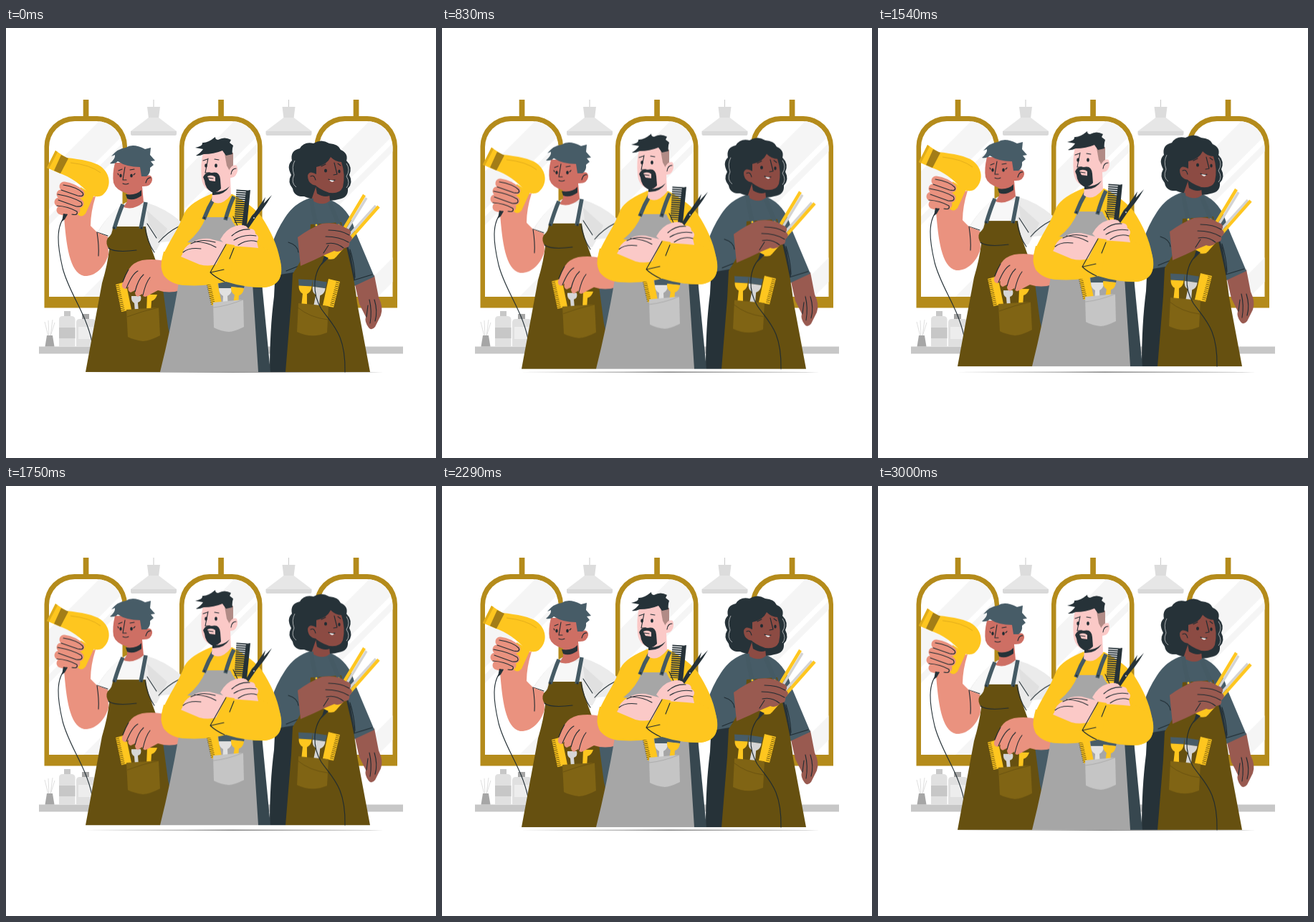
Recreate the animation shown at these times as an HTML page. Size 600x600 px, loop 3040 ms.

```html
<!DOCTYPE html>
<html lang="en">
<head>
<meta charset="utf-8">
<title>Hair salon team</title>
<style>
  html, body { margin: 0; width: 100%; height: 100%; overflow: hidden; background: #fff; }
  svg { display: block; width: 100vw; height: 100vh; }
  .ink { fill: none; stroke: #1f2b31; stroke-width: 1.1; stroke-linecap: round; stroke-linejoin: round; }
  .strap { fill: none; stroke: #455a64; stroke-width: 5.5; }
  .yellow { fill: #fec61f; }
  .ochre { fill: #b48b1b; }
  .brown { fill: #665010; }
  .pouch { fill: #806414; }
  .slate { fill: #475c67; }
  .dark { fill: #263238; }
  .tan { fill: #ea927f; }
  .blush { fill: #ce6f64; }
  .pink { fill: #fbc9c7; }
  .umber { fill: #995a50; }
  .cocoa { fill: #8c4b43; }
  .fingers { fill: none; stroke: #ea927f; stroke-width: 13; stroke-linecap: round; }
</style>
</head>
<body>
<svg viewBox="0 0 600 600">
  <defs>
    <path id="glass" d="M60 375V166A36 36 0 0 1 96 130H126.500A36 36 0 0 1 162.500 166V375Z"/>
    <clipPath id="pane"><use href="#glass"/></clipPath>
    <g id="mirror">
      <path class="ochre" d="M107.700 100h7.700v24h-7.700ZM53.500 390.500V165A42 42 0 0 1 95.500 123H127A42 42 0 0 1 169 165V390.500Z"/>
      <use href="#glass" fill="#fff"/>
      <g clip-path="url(#pane)" fill="#f5f5f5">
        <path d="M60 200L130 130H163V150L60 253ZM60 263L165 158V170L60 275ZM108 375L165 318V352L142 375Z"/>
      </g>
    </g>
    <g id="lamp">
      <path d="M206 100V111" stroke="#c9c9c9"/>
      <path fill="#dcdcdc" d="M197 110H215L213 126H199Z"/>
      <path fill="#e6e6e6" d="M199 125H213L238 144H174Z"/>
      <path fill="#d9d9d9" d="M174 144H238V148Q238 150 236 150H176Q174 150 174 148Z"/>
    </g>
    <g id="comb">
      <path class="yellow" d="M153 358L167 354 175 393 161 396Z"/>
      <path d="M155 359L163 395" stroke="#665010" stroke-width="6" stroke-dasharray=".9 1.800"/>
    </g>
    <g id="brush">
      <path class="slate" d="M-10 0H10L9 9H-9Z"/>
      <path d="M-9 9H9Q9 17 3 20L4 38H-4L-3 20Q-9 17 -9 9Z"/>
    </g>
  </defs>

  <rect width="600" height="600" fill="#fff"/>
  <use href="#mirror"/><use href="#mirror" x="188.500"/><use href="#mirror" x="377"/>
  <use href="#lamp"/><use href="#lamp" x="188.500"/>

  <g id="shelf">
    <path fill="#c7c7c7" d="M46 444.500H554V454.500H46Z"/>
    <path d="M59 430L54 410M60 430L59 408M62 430L65 407M62 430L68 411" stroke="#d7d7d7" stroke-width=".8"/>
    <path fill="#a6a6a6" d="M57 429H65L67.500 444.500H54.500Z"/>
    <path fill="#e0e0e0" d="M74 444.500V407Q74 402 79 402H91Q96.500 402 96.500 407V444.500ZM98 444.500V411Q98 406 103 406H120Q125 406 125 411V444.500Z"/>
    <path fill="#c7c7c7" d="M81 395H90V402H81ZM74 418H96.500V433H74Z"/>
    <path fill="#ededed" d="M101 417H123V434H101Z"/>
    <path fill="#a6a6a6" d="M106 399H116V406H106Z"/>
  </g>
  <path fill="#666" d="M105 480L316 479.600 527 480.100 316 480.700Z"/>

  <g id="crew">
    <g id="left">
      <path class="slate" d="M215 358H244L226 440Z"/>
      <path fill="#ebebeb" d="M168 243Q146 255 128 284L145 292 150 310H210L216 299 236 297 244 270Q222 251 194 243Z"/>
      <path fill="#f7f7f7" d="M163 246Q145 257 129 284L144 291 158 250ZM160 250L152 278H191L195 248Z"/>
      <path fill="#e0e0e0" d="M197 255L199 273 211 292 216 299 225 280Z"/>
      <path class="ink" d="M127 285Q136 288 142 290M197 273L210 293M213 299Q225 285 241 277"/>

      <path class="tan" d="M94 240L125 235Q118 257 118 276L127 285 142 291 143 316C137 337 122 347 109 346C88 342 84 300 81 264Z"/>
      <path class="ink" d="M127 285Q130 305 129 318"/>
      <path class="yellow" d="M104 222L123 233 111 259Q105 266 99 259Z"/>
      <path class="yellow" d="M69 171L84 181C105 183 124 187 132 193C146 203 148 222 135 233C129 237 121 235 117 232C104 218 91 208 73 202L57 195Z"/>
      <path fill="#e0ac1a" d="M69 171L57 195 60 196 72 173Z"/>
      <path fill="#a37d17" d="M77 177L87 182 76 203 67 199Z"/>
      <path d="M90 188Q118 191 132 202" fill="none" stroke="#dda91b" stroke-width=".8"/>
      <path class="fingers" d="M81 221Q94 223 103 231M77 232Q92 235 102 245M74 243Q88 246 97 254M77 254L88 257"/>
      <path class="ink" d="M80 219Q99 222 107 230 110 236 100 234L77 226M72 232Q94 236 105 243 109 250 98 249L73 240M71 248Q87 249 99 256 101 262 92 260"/>
      <path class="ink" d="M85 260C68 275 72 305 79 335C88 370 111 396 120 438"/>
      <path class="dark" d="M80 259L86 260 82 267 78 270Z"/>

      <path class="blush" d="M152 188Q148 204 150 216Q153 226 169 231L169 242Q166 247 164 250Q178 255 192 243L190 221Q203 222 204 211Q203 204 196 206L189 188Z"/>
      <path class="dark" d="M167 232Q182 234 189 226V234Q178 242 169 238Z"/>
      <path class="slate" d="M145 189Q153 182 152 177L147 179Q156 168 167 167Q177 160 194 169L202 167 201 177 208 185 202 186 206 191 201 195Q202 203 196 207L189 207 187 194Q168 194 156 186Q152 190 145 189Z"/>
      <path class="blush" d="M194 210Q202 202 204 211Q203 220 194 220Z"/>
      <path class="ink" d="M195 216Q197 208 202 209M166 194L163 212 168 212M163 217Q167 219 171 217"/>
      <path class="ink" d="M157 199L162 197M173 198L179 197" stroke-width="2"/>
      <g fill="#1f2b31"><ellipse cx="160" cy="206" rx="1.700" ry="2.500"/><ellipse cx="175" cy="206" rx="1.800" ry="2.500"/></g>
      <path class="ink" d="M157 205L156 203M178 205L180 203"/>

      <path class="brown" d="M149 277H195C198 303 213 327 218 357L226 417 240 480H111L134 356Q142 329 144 309Q138 300 142 293Q149 288 149 277Z"/>
      <path class="ink" d="M143 307Q152 314 182 310M194 278Q197 299 207 313"/>
      <path class="strap" d="M163 246Q157 260 151 280M195 243L188 280"/>
      <g class="dark"><circle cx="151" cy="279" r="1.500"/><circle cx="189" cy="279" r="1.500"/></g>
      <use href="#comb"/>
      <path fill="#d6d6d6" d="M175 374H188Q190 381 184 383L185 396H180L179 384Q174 381 175 374Z"/>
      <path class="yellow" d="M197 372H211Q209 379 203 381L202 397H196Z"/>
      <path class="pouch" d="M168 393L213 390 215 429Q202 436 191 437Q178 435 170 431Z"/>
      <path d="M169 403Q190 395 213 390" fill="none" stroke="#665010" stroke-width=".8"/>
      <path class="tan" d="M243 333C226 324 207 321 190 324Q177 327 171 337L162 357Q161 364 167 364L171 361Q169 367 174 369L180 366Q179 373 184 375L190 371Q192 377 197 374L212 366Q228 371 243 366Z"/>
      <path class="ink" d="M184 339Q176 343 168 363M192 344Q184 351 180 368M201 348Q195 355 191 373M171 337Q166 345 163 354"/>
    </g>

    <g id="right">
      <path class="dark" d="M376 335H403L391 480H368Q368 420 374 375Z"/>
      <path class="umber" d="M486 354L514 345 520 376Q527 390 523 401L515 417Q510 423 506 418Q500 410 502 403L493 385Z"/>
      <path class="ink" d="M507 379Q511 395 508 412M514 379Q519 395 515 409M503 403L505 387"/>
      <path class="slate" d="M425 237Q402 244 389 265Q377 283 370 305L383 344 401 341V360H486L514 347 487 283Q479 251 453 240Z"/>
      <path class="dark" d="M472 292L481 315 487 350 484 355Z"/>
      <path class="ink" d="M394 299Q407 303 408 313M391 339L411 331M480 309Q486 328 487 348M485 352L511 344"/>
      <path class="dark" d="M410 168Q416 158 429 161Q440 154 451 161Q464 162 467 170Q478 175 475 185Q484 194 479 205Q485 216 477 224Q478 237 464 239Q452 243 443 238Q426 240 416 235Q402 236 400 224Q392 215 398 205Q391 192 399 185Q396 171 410 168Z"/>
      <path class="cocoa" d="M433 194Q448 191 453 180Q460 187 468 187Q474 205 470 222Q466 232 451 230L452 241Q442 250 426 240L433 220Q421 218 421 206Q423 198 433 204Z"/>
      <path class="dark" d="M432 220Q444 229 456 231Q447 239 434 231Z"/>
      <path d="M403 185Q398 194 402 205Q397 216 405 222M475 189Q481 198 475 207Q481 216 475 223" fill="none" stroke="#fff" stroke-width=".6"/>
      <path class="ink" d="M425 207Q430 204 432 212M458 188L462 204 457 205M450 211Q454 214 459 212"/>
      <path d="M451 212L458 213Q455 217 451 212Z" fill="#fff"/>
      <path class="ink" d="M440 193L446 190M463 189L467 192" stroke-width="2"/>
      <g fill="#1f2b31"><ellipse cx="446" cy="199" rx="2" ry="2.600"/><ellipse cx="465" cy="200" rx="1.700" ry="2.500"/></g>

      <path class="brown" d="M425 274L468 271C473 304 486 342 490 384L508 480H390L398 382 400 343Q424 308 425 274Z"/>
      <path class="strap" d="M426 238Q428 258 434 277M452 244L465 276"/>
      <g class="yellow"><circle cx="433" cy="275" r="1.500"/><circle cx="464" cy="275" r="1.500"/></g>
      <use href="#brush" class="yellow" transform="translate(418 351) rotate(3)"/>
      <use href="#brush" fill="#d6d6d6" transform="translate(438 353) rotate(8)"/>
      <path class="yellow" d="M450 350L466 354 457 390 442 387Z"/>
      <path d="M463 355L454 389" stroke="#665010" stroke-width="5" stroke-dasharray=".9 1.800"/>
      <path class="pouch" d="M408 384L450 388 448 425Q427 434 406 424Z"/>
      <path d="M407 390Q424 404 449 407" fill="none" stroke="#665010" stroke-width=".8"/>

      <g fill="none" stroke-width="4.500">
        <path stroke="#d3d3d3" stroke-width="3.500" d="M473 286L503 237M478 290L516 248"/>
        <path stroke="#fec61f" d="M450 316L500 233M458 319L520 249"/>
      </g>
      <path class="yellow" d="M449 303L443 317Q448 325 458 322L469 309Z"/>
      <path class="umber" d="M407 292Q425 279 441 273Q462 270 474 279Q484 282 480 289Q486 294 479 299Q481 306 472 307Q466 314 458 311L446 316Q430 324 411 332Z"/>
      <path class="ink" d="M450 282Q468 282 479 289M446 291Q465 291 478 299M447 301Q460 298 471 307M443 314L450 303"/>
      <path class="ink" d="M448 321C424 341 429 374 440 392C456 415 474 427 473 480"/>
      <path class="dark" d="M444 318L450 321 440 331Z"/>
    </g>

    <g id="middle">
      <path fill="#37474f" d="M338 356H357L369 480H346Z"/>
      <path fill="#a6a6a6" d="M241 356H344L352 480H215Q230 420 241 356Z"/>
      <path class="yellow" d="M288 231Q257 243 249 258C241 280 227 298 219 318Q213 333 221 346Q232 358 250 359L284 358 307 354Q335 362 358 362C383 361 388 344 382 322Q377 295 357 264Q345 248 316 232Z"/>
      <path fill="#a6a6a6" d="M279 264H313Q318 276 326 281L300 305 253 299Q271 285 279 264Z"/>
      <path class="strap" d="M291 236Q282 251 276 267M318 235Q312 247 306 268"/>
      <g class="dark"><circle cx="277" cy="265" r="1.400"/><circle cx="307" cy="265" r="1.400"/></g>

      <path class="pink" d="M275 174Q271 190 273 210Q275 225 288 229L287 241Q299 251 314 233L313 209Q323 208 323 197Q322 190 316 193L317 176 300 168Z"/>
      <path fill="#b18b86" d="M305 175L317 174V192L313 201 308 192Z"/>
      <path class="pink" d="M311 199Q316 189 322 192Q325 200 318 208L311 209Z"/>
      <path class="dark" d="M265 178Q272 174 275 169L264 167Q275 165 274 160Q281 161 292 152Q292 156 296 156Q305 151 314 156L312 160 317 164Q315 170 316 176L307 178Q304 174 302 171Q290 176 276 176Q269 179 265 178Z"/>
      <path class="dark" fill-rule="evenodd" d="M275 208Q279 200 287 202Q298 199 299 211L300 224Q294 231 287 229Q278 224 277 213ZM281 207Q287 204 292 208L292 214 284 213Z"/>
      <path class="dark" d="M288 229Q302 230 312 221Q304 234 288 233Z"/>
      <path class="ink" d="M282 182L278 202 284 202M282 209L289 210M314 204Q315 196 321 196"/>
      <path class="ink" d="M275 185L281 183M291 183L297 184" stroke-width="2.200"/>
      <g fill="#1f2b31"><ellipse cx="279" cy="192" rx="1.800" ry="2.700"/><ellipse cx="293" cy="192" rx="1.900" ry="2.700"/></g>

      <use href="#comb" x="126" y="-9"/>
      <use href="#brush" fill="#e1e1e1" transform="translate(306 354)"/>
      <use href="#brush" class="yellow" transform="translate(324 353) rotate(6)"/>
      <path fill="#c5c5c5" d="M289 383L331 379 332 417Q318 424 311 424Q299 423 290 418Z"/>
      <path d="M289 390Q309 388 331 379" fill="none" stroke="#a6a6a6" stroke-width=".8"/>
      <path class="yellow" d="M220 312L246 312 297 331 310 299 352 302 381 319C388 344 383 361 358 362Q333 362 307 354Q280 361 249 359Q230 358 220 345Q214 333 220 312Z"/>

      <path class="dark" d="M335 227L341 226 336 276 329 276Z"/>
      <path d="M329 226L326 272" stroke="#263238" stroke-width="15" stroke-dasharray="1.700 1.300"/>
      <path class="dark" d="M371 233Q358 256 346 265L338 279 335 276 343 262ZM362 236Q358 254 349 264L338 280 335 277 344 262Z"/>
      <circle cx="346" cy="265" r="1" fill="#d9d9d9"/>
      <path class="ink" d="M317 263L323 276M334 276Q329 282 339 281" stroke-width="1.600"/>

      <path class="pink" d="M246 316Q247 306 260 299Q270 293 284 294L307 300 298 328Q285 334 270 330L244 319Z"/>
      <path class="pink" d="M299 295Q307 280 321 276Q334 273 338 280Q348 279 348 287Q355 291 350 298L352 307 342 306 314 304 307 303Z"/>
      <path class="ink" d="M315 290Q326 280 340 281M318 296Q332 287 349 290M324 303Q337 294 350 298M258 301Q274 293 292 299M247 313Q255 306 272 308M263 298Q282 299 293 306"/>
      <path class="yellow" d="M307 301L319 303 313 345 287 343Z"/>
      <path class="ink" d="M307 302L285 341Q292 348 305 354M318 307L312 322M286 341L304 337"/>
    </g>
  </g>
</svg>
<script>
  const lift = 8;
  const pose = y => ({ transform: `translate(0px, ${y}px)` });
  document.getElementById("crew").animate(
    [pose(0), pose(-lift), pose(0)],
    { duration: 3040, iterations: Infinity, easing: "linear" }
  );
</script>
</body>
</html>
```
